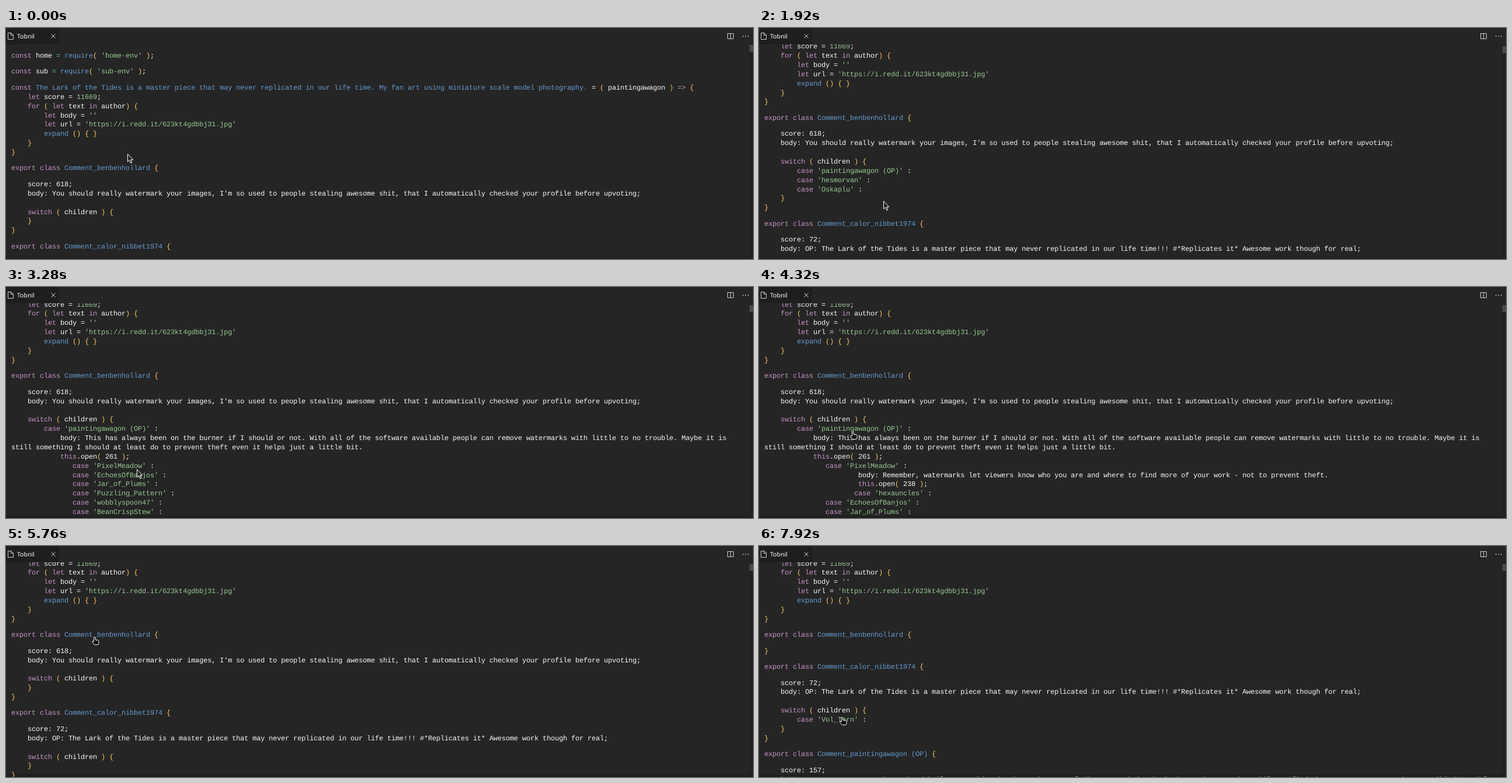
Animation of 1280 by 397 pixels, one loop 8000 ms. Source, as an HTML page with a canvas:

```html
<!DOCTYPE html>
<html lang="en">
<head>
<meta charset="utf-8">
<title>Code view</title>
<style>
  html, body { margin: 0; width: 100%; height: 100%; overflow: hidden; background: #252525; }
  canvas { display: block; }
</style>
</head>
<body>
<canvas id="stage" width="1280" height="397"></canvas>
<script>
const ctx = document.getElementById('stage').getContext('2d');
const LOOP = 8000, STEP = 80;
const LEFT = 9, CHAR = 7.003, LINE = 15.87, PARA = 27.45, FIRST = 51;
const MONO = '12px "Liberation Mono", monospace';

// "^x" in a row switches to colour x
const INK = {
  w: '#f8f8f8', p: '#c594c5', b: '#6699cc',
  g: '#99c794', y: '#fac863', c: '#5fb3b3'
};

const OP = 'paintingawagon';
const WORK = 'The Lark of the Tides is a master piece that may never replicated in our life time';

// Times at which blocks open or close
const OPEN_FIRST = 1040, OPEN_REPLY = 2320, OPEN_NESTED = 3600;
const CLOSE_SWITCH = 5120, CLOSE_FIRST = 6080, OPEN_SECOND = 7440;

// Pointer path: time, x, y, shape (a = arrow, h = hand)
const PATH = [
  [0, 208, 216, 'a'], [480, 208, 216, 'a'],
  [960, 160, 309, 'h'], [1520, 160, 309, 'h'],
  [1760, 213, 297, 'a'], [1920, 213, 297, 'a'],
  [2160, 200, 237, 'h'], [2880, 200, 237, 'h'],
  [3040, 206, 262, 'a'], [3280, 224, 313, 'a'],
  [3360, 209, 308, 'h'], [3840, 209, 308, 'h'],
  [3920, 208, 306, 'h'], [4080, 208, 306, 'h'],
  [4320, 156, 248, 'h'], [4480, 156, 248, 'h'],
  [4640, 190, 278, 'a'], [4800, 190, 278, 'a'],
  [4960, 132, 224, 'h'], [5360, 132, 224, 'h'],
  [5440, 138, 196, 'a'], [5600, 151, 124, 'a'],
  [5760, 147, 156, 'h'], [6560, 147, 156, 'h'],
  [6720, 149, 186, 'a'], [7120, 139, 278, 'h'],
  [7760, 139, 278, 'h'], [7920, 138, 294, 'h'],
  [LOOP, 138, 294, 'h']
];

// Scroll offset: time, pixels
const SCROLL = [[0, 0], [1760, 0], [1920, 86.6], [2000, 88.2], [LOOP, 88.2]];

const ARROW = new Path2D('M.5 .5V14L3.6 11.2L5.8 16.2L7.9 15.3L5.8 10.5H9.8Z');
const HAND = new Path2D(
  'M3.6 8V1.8Q3.6 .6 4.8 .6T6 1.8V5L10.5 5.8Q12 6.2 12 7.8V10.8L11 13.6H4.6L1 9.3Q.2 7.6 1.8 7.3Z');

function sample(keys, t) {
  let i = 0;
  while (i < keys.length - 2 && t >= keys[i + 1][0]) i++;
  const a = keys[i], b = keys[i + 1];
  const k = (t - a[0]) / (b[0] - a[0]);
  return a.map((v, n) => typeof v === 'number' ? v + (b[n] - v) * k : v);
}

function drawRow(text, col, y) {
  for (const part of text.split('^').slice(1)) {
    const s = part.slice(1);
    ctx.fillStyle = INK[part[0]];
    ctx.fillText(s, LEFT + col * CHAR, y);
    col += s.length;
  }
}

function drawCode(t, scroll) {
  let y = FIRST - scroll;
  const put = (text, col = 0, gap = LINE) => {
    y += gap;
    if (y > 10 && y < 412) drawRow(text, col, y);
  };
  const item = (name, col) => put(`^pcase ^g'${name}' ^w:`, col);
  const opened = (n, col) => put(`^pthis^w.open^y( ^w${n} ^y)^w;`, col);
  const comment = (name, score, lines, replies) => {
    put(`^pexport class ^bComment_${name} ^y{`, 0, PARA);
    if (!lines) return put('^y}', 0, PARA);
    put(`^wscore: ${score};`, 4, PARA);
    lines.forEach((s, i) => put('^w' + s, i ? 0 : 4));
    put('^pswitch ^y( ^wchildren ^y) {', 4, LINE * 2);
    replies();
    put('^y}', 4);
    put('^y}');
  };

  put("^pconst ^whome ^c= ^brequire^y( ^g'home-env' ^y)^w;", 0, 0);
  put("^pconst ^wsub ^c= ^brequire^y( ^g'sub-env' ^y)^w;", 0, PARA);
  put(`^pconst ^b${WORK}. My fan art using miniature scale model photography.` +
      `^w = ^y( ^w${OP} ^y) ^p=> ^y{`, 0, PARA);
  put('^plet ^wscore = ^g11669^w;', 4);
  put('^pfor ^y( ^plet ^wtext ^pin ^wauthor^y) {', 4);
  put("^plet ^wbody = ^g''", 8);
  put("^plet ^wurl = ^g'https://i.redd.it/623kt4gdbbj31.jpg'", 8);
  put('^bexpand ^y() { }', 8);
  put('^y}', 4);
  put('^y}');

  const firstBody = ["body: You should really watermark your images, I'm so used to people " +
    'stealing awesome shit, that I automatically checked your profile before upvoting;'];
  comment('benbenhollard', 618, t < CLOSE_FIRST && firstBody, () => {
    if (t < OPEN_FIRST || t >= CLOSE_SWITCH) return;
    item(OP + ' (OP)', 8);
    if (t >= OPEN_REPLY) {
      put('^wbody: This has always been on the burner if I should or not. With all of the software ' +
          'available people can remove watermarks with little to no trouble. Maybe it is', 12);
      put('^wstill something I should at least do to prevent theft even it helps just a little bit.');
      opened(261, 12);
      item('PixelMeadow', 15);
      if (t >= OPEN_NESTED) {
        put('^wbody: Remember, watermarks let viewers know who you are and where to find more ' +
            'of your work - not to prevent theft.', 23);
        opened(238, 23);
        item('hexauncles', 22);
      }
      ['EchoesOfBanjos', 'Jar_of_Plums', 'Puzzling_Pattern', 'wobblyspoon47',
        'BeanCrispStew', 'jumbledoldfox'].forEach(name => item(name, 15));
    }
    item('hesmorvan', 8);
    item('Oskaplu', 8);
  });

  comment('calor_nibbet1974', 72,
    [`body: OP: ${WORK}!!! #*Replicates it* Awesome work though for real;`],
    () => { if (t >= OPEN_SECOND) item('Vol_Tarn', 8); });

  comment(OP + ' (OP)', 157, [
    'body: Just want to note that I hand built everything in these photos excluding Mt Vash in the ' +
    'background. It took a while to find the proper camera to shoot. I did the models',
    'and the lighting at home;'
  ], () => {});
}

function line(color, width, ...pts) {
  ctx.strokeStyle = color;
  ctx.lineWidth = width;
  ctx.beginPath();
  pts.forEach(([x, y], i) => i ? ctx.lineTo(x, y) : ctx.moveTo(x, y));
  ctx.stroke();
}

function box(color, x, y, w, h) {
  ctx.fillStyle = color;
  ctx.fillRect(x, y, w, h);
}

function drawHeader() {
  box('#252525', 0, 0, 1280, 28);
  box('#1e1e1e', 0, 0, 91, 28);

  const grey = '#d0d0d0';
  line(grey, 1, [9, 8.5], [3.5, 8.5], [3.5, 19.5], [12.5, 19.5], [12.5, 12], [9, 8.5]);
  line(grey, 1, [8.5, 8.5], [8.5, 12.5], [12.5, 12.5]);
  ctx.font = '10.5px "Noto Sans", sans-serif';
  ctx.letterSpacing = '0px';
  ctx.fillStyle = '#fff';
  ctx.fillText('Tobnil', 19, 17.5);
  line(grey, 1, [77.5, 10.5], [84.5, 17.5]);
  line(grey, 1, [84.5, 10.5], [77.5, 17.5]);

  line(grey, 1, [1236.5, 9.5], [1246.5, 9.5], [1246.5, 18.5], [1236.5, 18.5], [1236.5, 9]);
  line(grey, 1, [1241.5, 9.5], [1241.5, 18.5]);
  for (const x of [1262, 1266.5, 1271]) box(grey, x, 13.5, 1.6, 1.6);
}

function drawPointer(t) {
  const [, x, y, shape] = sample(PATH, t);
  const path = shape === 'a' ? ARROW : HAND;
  ctx.save();
  ctx.translate(x, y);
  ctx.fillStyle = shape === 'a' ? '#222' : '#0c0c0c';
  ctx.strokeStyle = '#fff';
  ctx.lineWidth = 1;
  ctx.lineJoin = 'round';
  ctx.fill(path);
  ctx.stroke(path);
  if (shape === 'h') line('#fff', 0.6, [8, 5.6], [8, 7.4]);
  ctx.restore();
}

function draw(t) {
  const scroll = sample(SCROLL, t)[1];
  box('#252525', 0, 0, 1280, 397);
  box('#201f1f', 0, 393, 1280, 4);
  box('#212121', 1274, 28, 6, 369);
  box('#4b4b4b', 1274, 29 + scroll * 0.023, 6, 12);

  ctx.font = MONO;
  ctx.textRendering = 'geometricPrecision';
  ctx.letterSpacing = '0px';
  ctx.letterSpacing = (CHAR - ctx.measureText('M').width) + 'px';
  drawCode(t, scroll);
  drawHeader();
  drawPointer(t);
}

const start = performance.now();
function tick() {
  const t = (performance.now() - start) % LOOP;
  draw(Math.floor(t / STEP) * STEP);
  requestAnimationFrame(tick);
}
tick();
</script>
</body>
</html>
```
